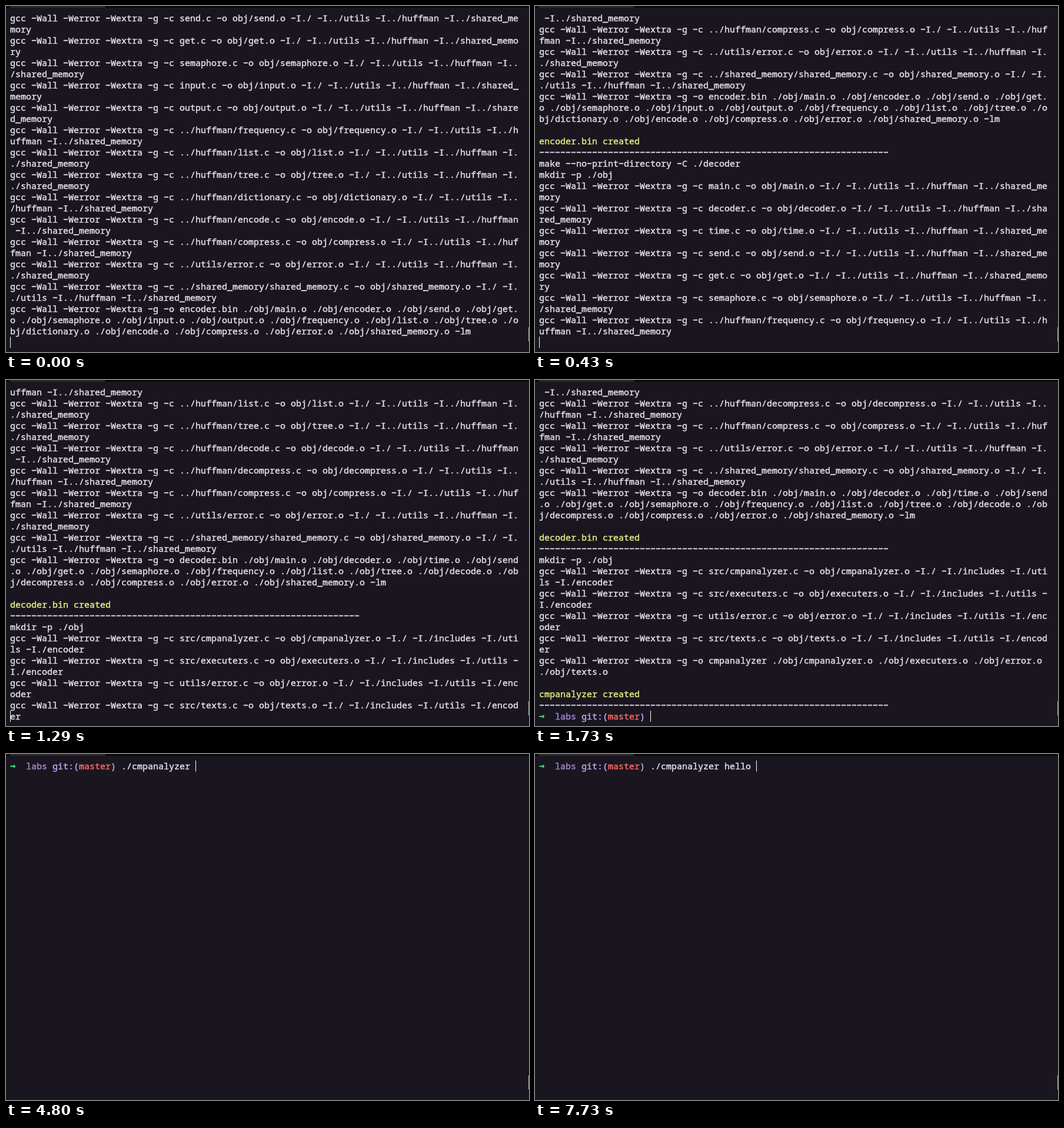
An HTML page that plays this animation: 889x588 px, repeating every 8000 ms.

```html
<!DOCTYPE html>
<html lang="en">
<head>
<meta charset="utf-8">
<title>Terminal build</title>
<style>
  html, body { margin: 0; width: 100%; height: 100%; overflow: hidden; background: #1a1620; }
  #stage { position: relative; width: 889px; height: 588px; overflow: hidden; }
  #stage > * { position: absolute; margin: 0; }
  #bar { left: 0; top: 0; width: 889px; height: 3px; background: #09090b; }
  #tab { left: 6px; top: 0; width: 163px; height: 3px; background: #29272b; border-radius: 3px 3px 0 0; }
  #thumb { left: 888px; top: 546px; width: 1px; height: 24px; background: #b5b3b8; }
  #screen {
    left: 7px; top: 11px; color: #e4e0ec;
    font: 15px/19px "Noto Sans Mono", "DejaVu Sans Mono", monospace;
    font-variant-ligatures: none;
    -webkit-text-stroke: 0.45px;
  }
  #screen div { height: 19px; white-space: pre; }
  #cursor { width: 1px; height: 19px; background: #fff; }
  .done { color: #e6ee84; }
  .arrow {
    display: inline-block; width: 9px; height: 19px; vertical-align: top;
    color: #3ee07c; font-family: "DejaVu Sans Mono", monospace; font-weight: 700;
  }
  .dir { color: #a688d4; }
  .git { color: #c3a5f7; }
  .branch { color: #ff6a62; }
</style>
</head>
<body>
<div id="stage">
  <div id="bar"></div>
  <div id="tab"></div>
  <div id="thumb"></div>
  <div id="screen"></div>
  <div id="cursor"></div>
</div>
<script>
const LOOP = 8000, COLS = 96, ROWS = 30, CHAR_W = 9, LINE_H = 19;
const GCC = 'gcc -Wall -Werror -Wextra -g';
const LIB_DIRS = '-I../utils -I../huffman -I../shared_memory';
const APP_DIRS = '-I./includes -I./utils -I./encoder';

const baseName = path => path.split('/').pop();
const compile = (files, dirs) => files.split(' ').map(file =>
  `${GCC} -c ${file}.c -o obj/${baseName(file)}.o -I./ ${dirs}`);
const link = (bin, files, libs = '') =>
  `${GCC} -o ${bin} ${files.split(' ').map(f => `./obj/${baseName(f)}.o`).join(' ')}${libs}`;
const created = bin => ['', `${bin} created`, '-'.repeat(66)];

const shared = '../utils/error ../shared_memory/shared_memory';
const encoder = 'send get semaphore input output ../huffman/frequency ../huffman/list ' +
  '../huffman/tree ../huffman/dictionary ../huffman/encode ../huffman/compress ' + shared;
const decoder = 'main decoder time send get semaphore ../huffman/frequency ../huffman/list ' +
  '../huffman/tree ../huffman/decode ../huffman/decompress ../huffman/compress ' + shared;
const app = 'src/cmpanalyzer src/executers utils/error src/texts';

const log = [
  ...compile(encoder, LIB_DIRS),
  link('encoder.bin', 'main encoder ' + encoder, ' -lm'),
  ...created('encoder.bin'),
  'make --no-print-directory -C ./decoder',
  'mkdir -p ./obj',
  ...compile(decoder, LIB_DIRS),
  link('decoder.bin', decoder, ' -lm'),
  ...created('decoder.bin'),
  'mkdir -p ./obj',
  ...compile(app, APP_DIRS),
  link('cmpanalyzer', app),
  ...created('cmpanalyzer')
];

// [time, printed lines, last newline still pending]
const output = [
  [0, 14], [130, 21], [280, 24, true], [430, 26], [560, 29, true],
  [710, 31], [860, 34], [1290, 42, true], [1420, 43]
];
const PROMPT_AT = 1730, CLEAR_AT = 2620;

// [time, typed characters]
const command = './cmpanalyzer hello ';
const typing = [
  [0, 0], [3780, 1], [4220, 2], [4520, 3], [4800, 14], [6560, 15],
  [6690, 16], [6990, 17], [7140, 18], [7580, 19], [7730, 20]
];
const PROMPT_COLS = 21;
const prompt = '<span class="arrow">→</span>  <span class="dir">labs</span> ' +
  '<span class="git">git:(<span class="branch">master</span>)</span> ';

const screen = document.getElementById('screen');
const cursor = document.getElementById('cursor');
const latest = (steps, t) => steps.filter(step => step[0] <= t).pop();

// Hyphens are shown as the wider, higher minus sign.
function wrap(line) {
  const rows = line.replaceAll('-', '−').match(new RegExp(`.{1,${COLS}}`, 'g')) || [''];
  return rows.map(row => row.endsWith(' created') ? `<span class="done">${row}</span>` : row);
}

function stateAt(t) {
  if (t < PROMPT_AT) {
    const [, count, pending] = latest(output, t);
    const rows = log.slice(0, count).flatMap(wrap);
    return { rows: pending ? rows : [...rows, ''], col: 0 };
  }
  const typed = latest(typing, t)[1];
  const history = t < CLEAR_AT ? log.flatMap(wrap) : [];
  return { rows: [...history, prompt + command.slice(0, typed)], col: PROMPT_COLS + typed };
}

let shown;
function draw(now) {
  const { rows, col } = stateAt(now % LOOP);
  const visible = rows.slice(-ROWS);
  const html = visible.map(row => `<div>${row}</div>`).join('');
  if (html !== shown) screen.innerHTML = shown = html;
  cursor.style.left = 7 + col * CHAR_W + 'px';
  cursor.style.top = 11 + (visible.length - 1) * LINE_H + 'px';
}

const start = performance.now();
function tick() {
  draw(performance.now() - start);
  requestAnimationFrame(tick);
}
tick();
</script>
</body>
</html>
```
